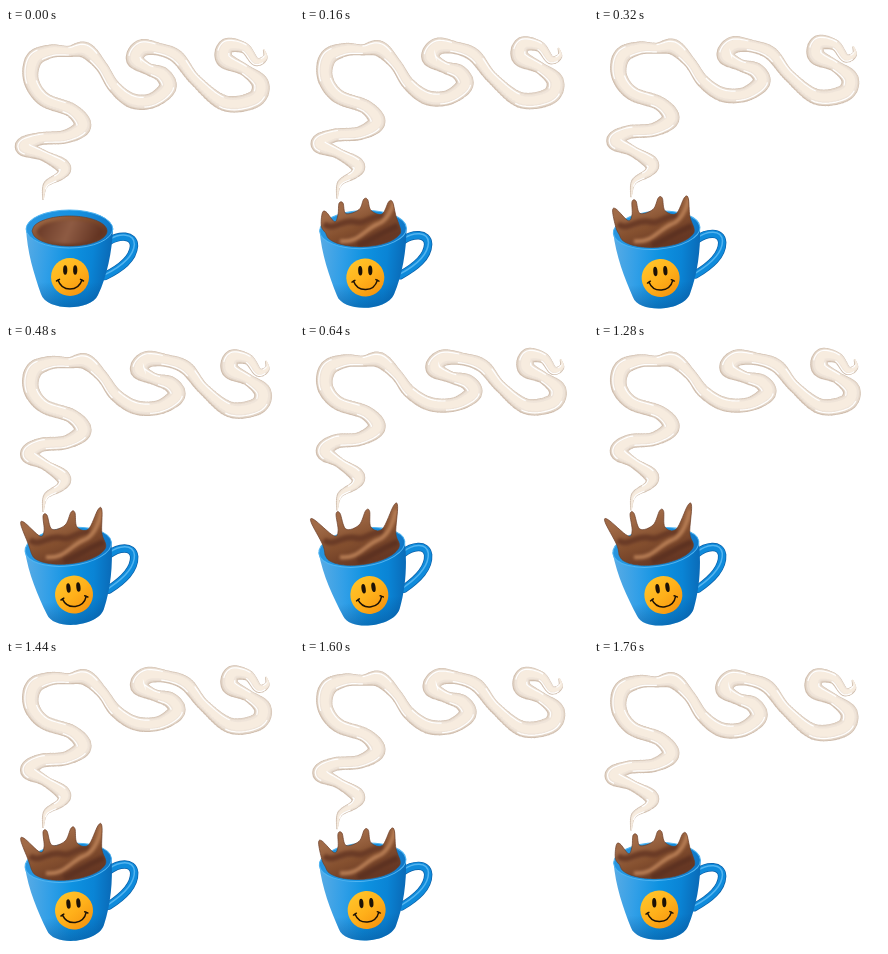
An HTML page with a canvas that plays this animation: 288 px wide and 288 px high, repeating every 1920 ms.

```html
<!DOCTYPE html>
<html lang="en">
<head>
<meta charset="utf-8">
<title>Coffee cup</title>
<style>
  html, body { margin: 0; width: 100%; height: 100%; overflow: hidden; background: #fff; }
  canvas { display: block; width: 288px; height: 288px; }
</style>
</head>
<body>
<canvas id="stage" width="288" height="288"></canvas>
<script>
const ctx = document.getElementById('stage').getContext('2d');
const STEP = 160, LAST = 6, TILT = .22;
const PIVOT = { x: 73, y: 213 };

// Key points of the smoke at full swing, from the cup upwards.
const smoke = [
  [37, 163], [40, 148], [55, 138], [57, 128], [40, 114], [28, 102], [37, 91], [60, 88],
  [77, 76], [66, 62], [38, 53], [25, 38], [28, 21], [45, 14], [63, 14], [80, 13], [97, 27],
  [111, 43], [133, 54], [160, 54], [179, 44], [173, 34], [154, 29], [137, 21], [146, 11],
  [168, 12], [189, 19], [206, 38], [230, 56], [254, 53], [259, 41], [246, 30], [230, 21],
  [232, 9], [246, 11], [255, 23], [263, 20], [262, 13]
];

// Splash arms, left to right, at full swing.
const arms = [
  { root: [28, 196], tip: [5, 172], width: 7 },
  { root: [42, 186], tip: [36, 166], width: 4 },
  { root: [65, 182], tip: [69, 164], width: 6 },
  { root: [89, 187], tip: [99, 154], width: 7 }
];

const lerp = (a, b, k) => a + (b - a) * k;
const clamp = (v, lo, hi) => Math.max(lo, Math.min(hi, v));
const bell = (v, mid, width) => Math.exp(-(((v - mid) / width) ** 2));

function gradient(x0, y0, x1, y1, ...colors) {
  const g = ctx.createLinearGradient(x0, y0, x1, y1);
  colors.forEach((c, i) => g.addColorStop(i / (colors.length - 1), c));
  return g;
}

function stroke(path, color, width) {
  ctx.strokeStyle = color;
  ctx.lineWidth = width;
  ctx.stroke(path);
}

// Catmull-Rom curve through the points, n samples per span.
function sample(pts, n) {
  const out = [], at = i => pts[clamp(i, 0, pts.length - 1)];
  for (let i = 0; i < pts.length - 1; i++)
    for (let t = 0; t < 1; t += 1 / n)
      out.push(at(i).map((b, c) => {
        const a = at(i - 1)[c], d = at(i + 1)[c], e = at(i + 2)[c];
        return b + .5 * t * (d - a + t * (2 * a - 5 * b + 4 * d - e + t * (3 * (b - d) + e - a)));
      }));
  out.push(at(pts.length - 1));
  return out;
}

// At rest the smoke hangs lower, its middle further left and its first loop wider.
function sway([x, y], k) {
  const u = 1 - k;
  return [
    x - u * (18 * bell(x, 190, 60) + 11 * bell(x, 25, 14) * bell(y, 103, 22)),
    y + u * (8 + 14 * bell(y, 75, 40))
  ];
}

// The ribbon swells in its bends and tapers at both ends.
function swell(p, i, pts) {
  const a = pts[Math.max(0, i - 1)], b = pts[Math.min(pts.length - 1, i + 1)];
  const turn = Math.atan2(b[1] - p[1], b[0] - p[0]) - Math.atan2(p[1] - a[1], p[0] - a[0]);
  const bend = Math.abs(Math.sin(turn / 2));
  const taper = Math.min(1, .1 + i / 4, .1 + (pts.length - 1 - i) / 5);
  return [...p, taper * (5.4 + 3.4 * Math.min(1, bend * 2))];
}

function stamp(line, color, shift, size) {
  ctx.fillStyle = color;
  ctx.beginPath();
  for (const [x, y, r] of line) {
    const q = Math.max(.3, size(r));
    ctx.moveTo(x + shift + q, y - shift);
    ctx.arc(x + shift, y - shift, q, 0, 7);
  }
  ctx.fill();
}

// Broken white highlight along one side of the ribbon.
function glint(line, side, phase) {
  const path = new Path2D();
  let pen = false;
  for (let i = 1; i < line.length - 1; i++) {
    const [x, y, r] = line[i];
    const dx = line[i + 1][0] - line[i - 1][0], dy = line[i + 1][1] - line[i - 1][1];
    const o = side * r * .65 / (Math.hypot(dx, dy) || 1);
    const on = r > 2 && (i + phase) % 34 < 18;
    if (on) path[pen ? 'lineTo' : 'moveTo'](x - dy * o, y + dx * o);
    pen = on;
  }
  stroke(path, '#fff', 1.2);
}

function drawSmoke(k) {
  const line = sample(smoke.map(p => sway(p, k)).map(swell), 10);
  stamp(line, '#d0beae', 0, r => r);
  stamp(line, '#e4d7ca', .3, r => r - .8);
  stamp(line, '#efe4d9', .4, r => r * .75);
  stamp(line, '#f7ecdf', .5, r => r * .5);
  glint(line, 1, 0);
  glint(line, -1, 17);
}

function tiltCup(k) {
  ctx.translate(PIVOT.x, PIVOT.y + 1.5 * k);
  ctx.rotate(-TILT * k);
  ctx.translate(-PIVOT.x, -PIVOT.y);
}

function drawCup() {
  const handle = new Path2D('M103 213C113 207 128 206 128 218C127 231 115 240 99 248');
  ctx.lineCap = 'round';
  stroke(handle, '#0a5fa8', 8.4);
  stroke(handle, '#0f8bdb', 7);
  ctx.save();
  ctx.translate(.4, -1.6);
  stroke(handle, '#52b4f0', 1.5);
  ctx.restore();

  const body = new Path2D('M20 199C21 224 28 246 35 266C40 283 84 284 92 267C101 248 106 224 107 201Z');
  ctx.fillStyle = gradient(20, 222, 108, 234, '#55aae5', '#319fe7', '#0e92e1', '#0a84d5', '#0a64b0');
  ctx.fill(body);
  ctx.fillStyle = gradient(0, 254, 0, 284, 'rgba(4,64,130,0)', 'rgba(4,64,130,.5)');
  ctx.fill(body);

  const rim = new Path2D();
  rim.ellipse(63.5, 201, 43.4, 19, 0, 0, 7);
  ctx.fillStyle = gradient(20, 185, 106, 215, '#2b96df', '#1592e2', '#0f74c4');
  ctx.fill(rim);
  stroke(rim, '#4fb5f2', 1);
}

function drawFace() {
  ctx.save();
  ctx.translate(64, 249);
  ctx.beginPath();
  ctx.arc(0, 0, 19, 0, 7);
  ctx.fillStyle = gradient(-12, -16, 12, 18, '#ffc329', '#ffb01a', '#f5930e');
  ctx.fill();
  ctx.fillStyle = '#1d1206';
  for (const x of [-4.8, 5.2]) {
    ctx.beginPath();
    ctx.ellipse(x, -7, 2.1, 4.8, 0, 0, 7);
    ctx.fill();
  }
  stroke(new Path2D('M-12 3C-8 15 8 15 12 3M-13.5 4L-10.5 2.4M13.5 4L10.5 2.4'), '#1d1206', 1.5);
  ctx.restore();
}

// Point on the coffee level inside the tilted rim.
function level(angle, k) {
  const x = 63.5 + 37.5 * Math.cos(angle) - PIVOT.x, y = 203 + 15 * Math.sin(angle) - PIVOT.y;
  const c = Math.cos(TILT * k), s = Math.sin(TILT * k);
  return [PIVOT.x + x * c + y * s, PIVOT.y + 1.5 * k - x * s + y * c];
}

// Four outline points of an arm: left foot, both sides of the tip, right foot.
function arm({ root: [x, y], tip, width }, k) {
  const tx = lerp(x, tip[0], k), ty = lerp(y - 9, tip[1], k);
  const len = Math.hypot(tx - x, ty - y);
  const nx = (ty - y) / len, ny = (x - tx) / len;
  const beside = (px, py, w) => [px + nx * w, py + ny * w];
  return [beside(x, y, width), beside(tx, ty, 2), beside(tx, ty, -2), beside(x, y, -width)];
}

function coffeeOutline(k) {
  const arc = (from, to, n) => Array.from({ length: n + 1 }, (_, i) => level(lerp(from, to, i / n), k));
  const front = arc(0, Math.PI, 8);
  const top = k ? arms.flatMap(a => arm(a, k)) : arc(Math.PI, 2 * Math.PI, 8).slice(1, -1);
  const path = new Path2D();
  sample([front[8], ...top, ...front], 8).forEach(([x, y]) => path.lineTo(x, y));
  path.closePath();
  return path;
}

function drawCoffee(k) {
  const path = coffeeOutline(k);
  ctx.fillStyle = gradient(40, lerp(186, 170, k), 56, 222, '#a06a47', '#85502f', '#673824');
  ctx.fill(path);
  ctx.save();
  ctx.clip(path);
  ctx.filter = 'blur(1.5px)';
  if (k) {
    stroke(new Path2D('M24 196C34 204 42 190 56 194C66 197 72 186 84 188'), '#6a3b26', 6);
    stroke(new Path2D('M40 213C58 216 66 200 78 196C86 193 92 184 96 166'), '#b87e55', 4);
    stroke(new Path2D('M58 218C72 212 82 204 98 198'), '#5d3221', 6);
  } else {
    ctx.fillStyle = gradient(34, 192, 90, 216, '#6a3a27', '#8e5b43', '#623321');
    ctx.beginPath();
    ctx.ellipse(64, 204, 33, 12, 0, 0, 7);
    ctx.fill();
  }
  ctx.restore();
  stroke(path, '#6b3d27', .7);
}

function draw(pose) {
  const k = pose / LAST;
  ctx.fillStyle = '#fff';
  ctx.fillRect(0, 0, 288, 288);
  drawSmoke(k);
  ctx.save();
  tiltCup(k);
  drawCup();
  drawFace();
  ctx.restore();
  drawCoffee(k);
}

const start = performance.now();
function tick() {
  const n = Math.floor((performance.now() - start) / STEP) % (2 * LAST);
  draw(LAST - Math.abs(LAST - n));
  requestAnimationFrame(tick);
}
tick();
</script>
</body>
</html>
```
